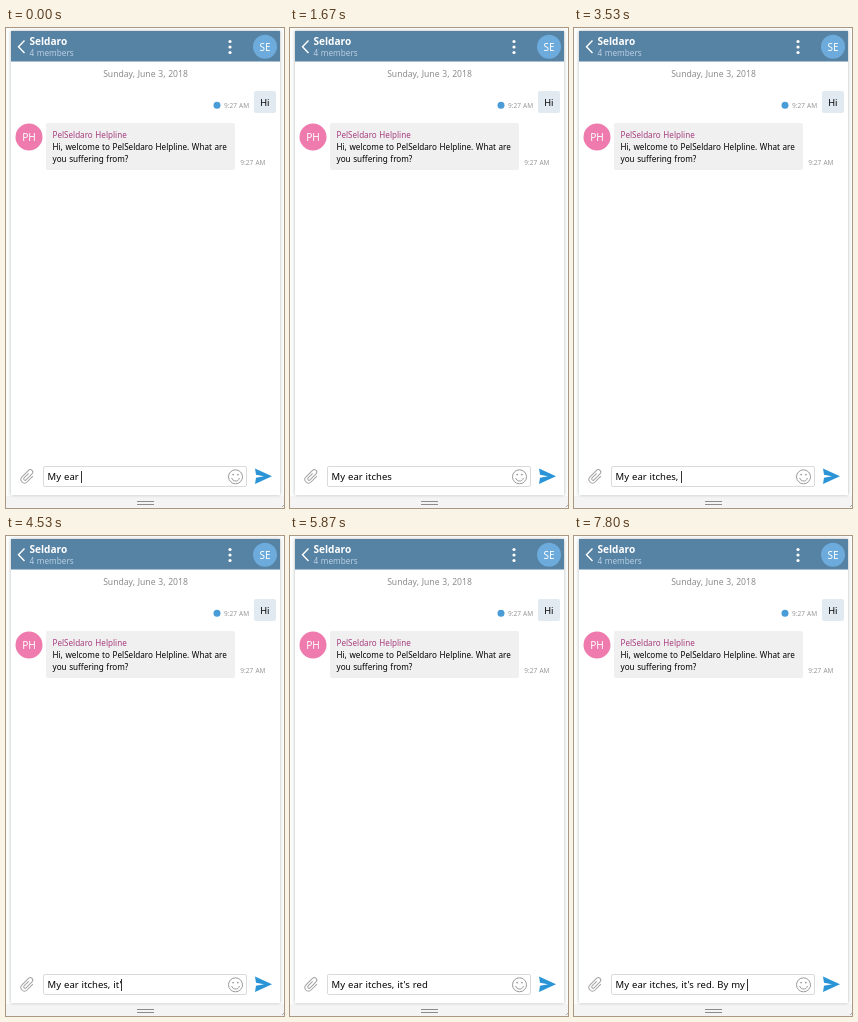
Write an HTML page with a canvas that moves like this. It is 278 by 480 pixels and loops after 8000 ms.

```html
<!DOCTYPE html>
<html lang="en">
<head>
<meta charset="utf-8">
<title>Helpline chat</title>
<style>
  html, body { margin: 0; width: 100%; height: 100%; overflow: hidden; background: #fbfcfc; }
  canvas { display: block; width: 278px; height: 480px; }
</style>
</head>
<body>
<canvas id="stage"></canvas>
<script>
const W = 278, H = 480, LOOP = 8000;
const canvas = document.getElementById('stage');
const ctx = canvas.getContext('2d');
const ratio = window.devicePixelRatio || 1;
canvas.width = W * ratio;
canvas.height = H * ratio;
ctx.scale(ratio, ratio);

const MESSAGE = "My ear itches, it's red. By my ";
const START_LENGTH = 7;
// Each key press adds one character.
const KEYS = [
  70, 400, 600, 730, 870, 1130,
  2470, 2530, 3800, 4130, 4530, 4600, 4800,
  5000, 5200, 5330, 6270, 6470, 6800,
  7000, 7130, 7330, 7730, 7800
];
const CARET_OFF = [[1670, 2130], [3000, 3530], [5870, 6270]];

function setFont(size, weight = 400) {
  ctx.font = `${weight} ${size}px "Noto Sans", "Open Sans", sans-serif`;
  ctx.wordSpacing = '0.5px';
}

function text(str, x, y, size, color, align = 'left', weight = 400) {
  setFont(size, weight);
  ctx.textAlign = align;
  ctx.fillStyle = color;
  ctx.fillText(str, x, y);
}

function rect(x, y, w, h, color, radius = 0) {
  ctx.fillStyle = color;
  ctx.beginPath();
  ctx.roundRect(x, y, w, h, radius);
  ctx.fill();
}

function disc(x, y, r, color) {
  ctx.fillStyle = color;
  ctx.beginPath();
  ctx.arc(x, y, r, 0, Math.PI * 2);
  ctx.fill();
}

function polyline(points, color, width) {
  ctx.strokeStyle = color;
  ctx.lineWidth = width;
  ctx.beginPath();
  points.forEach(([x, y]) => ctx.lineTo(x, y));
  ctx.stroke();
}

function avatar(x, y, r, color, initials, size) {
  disc(x, y, r, color);
  text(initials, x, y + size * 0.38, size, '#fff', 'center');
}

function drawPanel() {
  rect(0, 0, W, H, '#fbfcfc');
  rect(0, 468, W, 12, '#f4f4f4');
  ctx.save();
  ctx.shadowColor = 'rgba(0,0,0,.28)';
  ctx.shadowBlur = 3 * ratio;
  rect(5, 3, 269, 464, '#fff');
  ctx.restore();
  polyline([[131, 473.5], [148, 473.5]], '#8c8c8c', 1);
  polyline([[131, 476.5], [148, 476.5]], '#8c8c8c', 1);
  polyline([[276, 479], [278, 477]], '#aaa', 1);
}

function drawHeader() {
  rect(5, 3, 269, 30.5, '#5682a3');
  polyline([[18.5, 12.5], [12.5, 18.7], [18.5, 25]], '#fff', 1.4);
  text('Seldaro', 23.5, 16.8, 10.1, '#fff', 'left', 700);
  text('4 members', 23.5, 28.3, 8.2, '#b9cfe3');
  [13.5, 19, 24.5].forEach(y => disc(224, y, 1.6, '#fff'));
  avatar(259, 18.8, 12, '#6cabdc', 'SE', 10);
}

function drawMessages() {
  text('Sunday, June 3, 2018', 139.5, 49.3, 8.6, '#8c8c8c', 'center');

  rect(248, 63, 22, 22, '#e1e9f1', 2);
  text('Hi', 254.2, 77.5, 9.3, '#000');
  disc(211, 77.2, 3.5, '#4a9cd6');
  text('9:27 AM', 218, 80, 6.5, '#999');

  avatar(23, 109, 13.5, '#ee7aae', 'PH', 10.2);
  rect(40, 95, 189, 47, '#f0f0f0', 2);
  text('PelSeldaro Helpline', 46.5, 110, 8.1, '#a73d7e');
  text('Hi, welcome to PelSeldaro Helpline. What are', 46.5, 122.2, 8.15, '#000');
  text('you suffering from?', 46.5, 134.2, 8.15, '#000');
  text('9:27 AM', 234.3, 137, 6.5, '#999');
}

function drawClip() {
  ctx.save();
  ctx.translate(21.5, 448.5);
  ctx.rotate(Math.PI / 4);
  ctx.strokeStyle = '#a3a3a3';
  ctx.lineWidth = 1;
  ctx.beginPath();
  ctx.moveTo(3.6, -4);
  ctx.lineTo(3.6, 4.2);
  ctx.arc(0, 4.2, 3.6, 0, Math.PI);
  ctx.lineTo(-3.6, -5);
  ctx.arc(-1.1, -5, 2.5, Math.PI, 0);
  ctx.lineTo(1.4, 3.4);
  ctx.arc(0, 3.4, 1.4, 0, Math.PI);
  ctx.lineTo(-1.4, -3);
  ctx.stroke();
  ctx.restore();
}

function drawSmiley(x, y) {
  const color = '#9a9a9a';
  ctx.strokeStyle = color;
  ctx.lineWidth = 1;
  ctx.beginPath();
  ctx.arc(x, y, 7, 0, Math.PI * 2);
  ctx.stroke();
  ctx.beginPath();
  ctx.arc(x, y + 0.2, 4, 0.25, Math.PI - 0.25);
  ctx.stroke();
  disc(x - 2.4, y - 2.2, 0.9, color);
  disc(x + 2.4, y - 2.2, 0.9, color);
}

function drawPlane() {
  ctx.fillStyle = '#2b94d6';
  ctx.beginPath();
  [[249, 440.5], [266, 448.3], [249, 456], [250, 449.8], [258, 448.3], [250, 446.8]]
    .forEach(([x, y]) => ctx.lineTo(x, y));
  ctx.fill();
}

function drawInput(time) {
  drawClip();
  ctx.strokeStyle = '#dadada';
  ctx.lineWidth = 1;
  ctx.beginPath();
  ctx.roundRect(37.5, 438.5, 203, 20, 1.5);
  ctx.stroke();
  drawSmiley(229.5, 448.8);
  drawPlane();

  const typed = START_LENGTH + KEYS.filter(key => time >= key).length;
  const shown = MESSAGE.slice(0, typed);
  text(shown, 41.6, 452.2, 9.5, '#000');
  const hidden = CARET_OFF.some(([from, to]) => time >= from && time < to);
  if (!hidden) {
    const x = Math.round(41.1 + ctx.measureText(shown).width);
    rect(x, 443, 1, 12, '#333');
  }
}

function draw(now) {
  drawPanel();
  drawHeader();
  drawMessages();
  drawInput(now % LOOP);
}

const start = performance.now();
function tick() {
  draw(performance.now() - start);
  requestAnimationFrame(tick);
}
tick();
</script>
</body>
</html>
```
